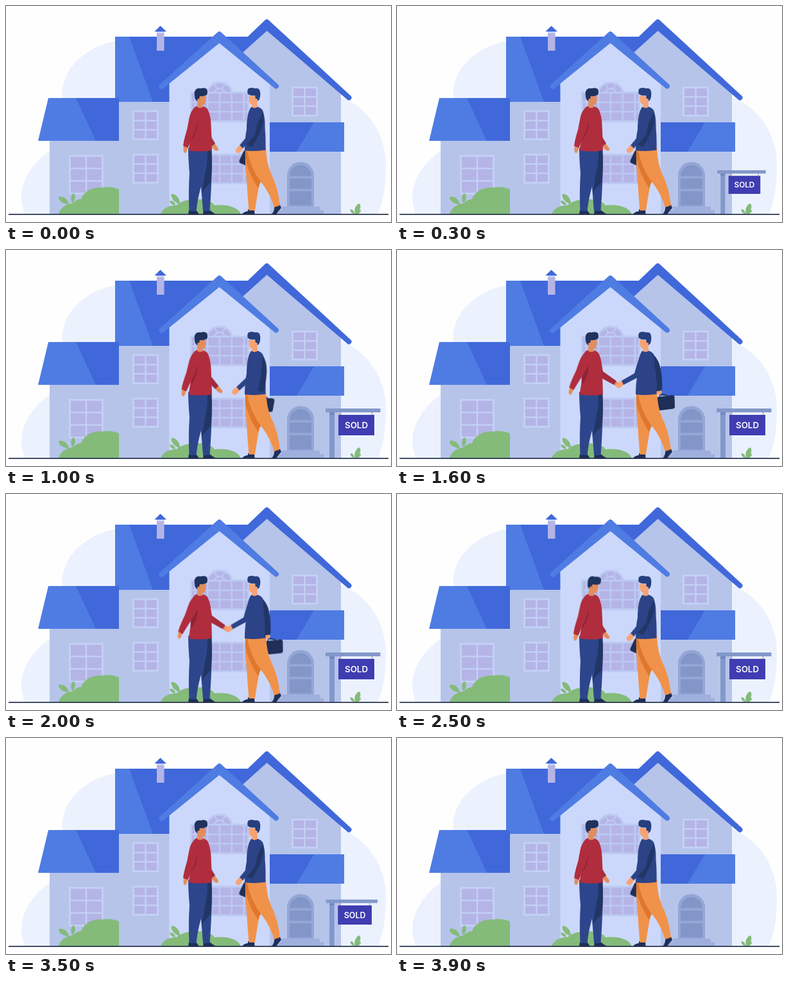
These frames come from a looping animation (600x338 px, 4 s). An HTML page:

```html
<!DOCTYPE html>
<html lang="en">
<head>
<meta charset="utf-8">
<title>House sold</title>
<style>
  html, body { margin: 0; width: 100%; height: 100%; overflow: hidden; background: #fefefe; }
  svg { display: block; width: 600px; height: 338px; }

  .sign, .head, .arm { animation: 4s cubic-bezier(.65, 0, .35, 1) infinite; }

  .sign { transform-origin: 506px 326px; animation-name: sign; }
  @keyframes sign {
    0%, 2.5% { transform: scale(0); animation-timing-function: cubic-bezier(.2, .7, .3, 1); }
    13.5%, 83.5% { transform: scale(1); animation-timing-function: cubic-bezier(.6, 0, .8, .4); }
    95%, 100% { transform: scale(0); }
  }

  .buyer .head { transform-origin: 303px 158px; animation-name: buyer-nod; }
  @keyframes buyer-nod {
    0%, 55% { transform: none; }
    62.5% { transform: rotate(10deg); }
    70%, 100% { transform: none; }
  }
  .agent .head { transform-origin: 388px 158px; animation-name: agent-nod; }
  @keyframes agent-nod {
    0%, 7.5% { transform: none; }
    15% { transform: rotate(-9deg); }
    22.5%, 100% { transform: none; }
  }

  .buyer .shake { transform-origin: 312px 168px; animation-name: buyer-shake; }
  @keyframes buyer-shake {
    0%, 17.5%, 63.75%, 100% { transform: translate(1px, 1.5px) rotate(23deg); }
    35%, 47.5% { transform: translate(0, 0) rotate(0deg); }
  }
  .agent .shake { transform-origin: 384px 165px; animation-name: agent-shake; }
  @keyframes agent-shake {
    0%, 17.5%, 62.5%, 100% { transform: translate(-1.5px, 4px) rotate(-20deg); }
    35%, 47.5% { transform: translate(0, 0) rotate(0deg); }
  }
  .buyer .swing { transform-origin: 297px 168px; animation-name: buyer-swing; }
  @keyframes buyer-swing {
    0%, 17.5%, 68%, 100% { transform: none; }
    35%, 51% { transform: rotate(9deg); }
  }
  .agent .swing { transform-origin: 397px 165px; animation-name: agent-swing; }
  @keyframes agent-swing {
    0%, 17.5%, 61.5%, 100% { transform: rotate(30deg); }
    31.5%, 47.5% { transform: none; }
  }
</style>
</head>
<body>
<svg viewBox="0 0 600 338" xmlns="http://www.w3.org/2000/svg">
  <path fill="#ebf2fe" d="M30 326C15 295 28 256 68 226C96 205 98 180 90 158C82 126 94 96 122 76C138 64 154 58 172 55L400 60L522 142C566 160 592 202 592 248C592 282 588 308 579 326Z"/>

  <!-- right wing -->
  <path fill="#b6c4ea" d="M406 34L522 136V326H400V122L366 72Z"/>

  <!-- main roof and left wing -->
  <path fill="#b6c4ea" d="M68 211H176V150H256V326H68Z"/>
  <path fill="#4068da" d="M170 48H385L360 80L254 150H170Z"/>
  <path fill="#4f7ce3" d="M170 48H192L229 150H170Z"/>
  <path fill="#4068da" stroke="#4068da" stroke-width="8" stroke-linejoin="round" d="M534.500 143.500L406.500 25L366 64V70L406.500 33.500Z"/>
  <path fill="#4f7ce3" d="M66 144H176V211H50Z"/>
  <path fill="#4068da" d="M109 144H176V211H140Z"/>
  <path fill="#b5b4e6" d="M235 40H246.500V70H235Z"/>
  <path fill="#cbd6f8" d="M235 40H246.500V42.500H235Z"/>
  <path fill="#4068da" d="M231.500 40L240.500 31L250 40Z"/>

  <!-- middle gable -->
  <path fill="#ccd8fb" d="M254.500 118L332.500 50L411 118V326H254.500Z"/>
  <path fill="#4f7ce3" stroke="#4f7ce3" stroke-width="8" stroke-linejoin="round" d="M242.500 126L332.500 44L421 125.500L332.500 53Z"/>

  <!-- porch -->
  <path fill="#4068da" d="M411 182H527V228H411Z"/>
  <path fill="#4f7ce3" d="M480 182H527V228H453Z"/>
  <path fill="#9fb0de" d="M430 314H489V319.500H495V326H420V319.500H430Z"/>
  <path fill="#93a6d6" d="M438 314V265A21 21 0 0 1 480 265V314Z"/>
  <path fill="#8396c8" d="M442 266A17 17 0 0 1 476 266ZM442 270H476V286H442ZM442 290H476V312H442Z"/>

  <g id="windows">
    <path fill="#bccaf2" d="M312.500 137A20 18 0 0 1 353.500 137Z"/>
    <path fill="#b5b4e6" d="M316 135A17 13.500 0 0 1 350 135Z"/>
    <path fill="none" stroke="#bccaf2" stroke-width="2.400" d="M325 136A8 7 0 0 1 341 136M329 129L323 119M337 129L343 119"/>
  </g>

  <!-- plants -->
  <g fill="#84bb79">
    <path d="M82 326C84 317 92 310 103 309C109 304 112 303 117 302C121 290 135 283 149 284C160 282 170 284 176 287V326Z"/>
    <path d="M241 326C244 317 255 311 265 312C274 305 283 302 292 304C304 300 320 304 325 312C343 310 362 314 366 326Z"/>
    <path d="M98 311C88 309 81 304 82 299C88 296 97 302 98 311ZM103 308C100 302 101 294 106 293C109 297 108 305 103 308Z"/>
    <path d="M271 310C262 308 256 299 258 294C265 293 272 303 271 310ZM264 312C259 311 255 308 255 305C260 304 264 308 264 312Z"/>
    <path d="M544 326C542 318 545 310 551 309C555 315 550 323 544 326ZM543 326C538 324 536 321 537 318C541 318 543 322 543 326ZM546 326C547 321 550 319 553 319C553 323 550 325 546 326Z"/>
  </g>

  <g class="sign">
    <path fill="#8398ca" d="M504 251H512V326H504Z"/>
    <path fill="#7388bd" d="M504 254H512V258H504Z"/>
    <path fill="#8398ca" d="M498 248H583.500V254H498Z"/>
    <path stroke="#b9a39d" stroke-width="1.500" d="M521.500 254V259M570.500 254V259"/>
    <path fill="#3f3db1" d="M518 258H574V290H518Z"/>
    <text x="546" y="278.800" text-anchor="middle" fill="#fff" font-family="Inter, Roboto, sans-serif" font-size="13.300" font-weight="600">SOLD</text>
  </g>

  <path stroke="#29344f" stroke-width="1.800" d="M4 326.100H596"/>

  <g class="buyer">
    <g class="arm shake">
      <path fill="#e38c5c" d="M339 205Q346 207 350 211Q351 215 346 215Q340 213 337 210Z"/>
      <path fill="#a32a3b" d="M308 166Q314 162 317 170L321 190L342 205L338 211L316 199Q310 190 308 166Z"/>
    </g>
    <path fill="#1f2f57" d="M308 319H317Q322 323 327 326H307ZM285 319H296Q299 323 301 326H284Z"/>
    <path fill="#2d468b" d="M298 222L320 224Q322 262 317.500 321H307Q304 280 298 222Z"/>
    <path fill="#223665" d="M309 226H320.500Q322 255 319 276Q310 284 305 293Q312 262 309 226Z"/>
    <path fill="#2d468b" d="M284 222L314 224Q315 252 306 276Q299 297 296.500 321H285.500Q284 290 286 262Q284 240 284 222Z"/>
    <path fill="#b02d3d" d="M296 157Q308 155 314 161Q319 171 319.500 185Q320.500 205 321 226Q304 229 284.500 226Q289 205 288 184Q288 162 296 157Z"/>
    <path fill="#8b2435" d="M299 180Q298 198 289 210L288 198Z"/>
    <g class="arm swing">
      <path fill="#e38c5c" d="M277 218L283 220Q283 226 280 230Q276 230 276.500 224Z"/>
      <path fill="#b02d3d" d="M297 157Q287 163 285 178Q283 192 279 204Q277 211 276 219L283.500 222Q289 208 294 197Q299 184 300 172Z"/>
    </g>
    <g class="head">
      <path fill="#e38c5c" d="M299 142L311 140Q312 148 310 153Q308 155 306 154L307 158Q302 161 298 158Z"/>
      <path fill="#20335f" d="M295 146Q293 139 294 134Q296 128 303 129Q310 127 313 130Q315 135 313 139Q307 142 302 141L301 146L298 149Z"/>
      <circle cx="300" cy="147" r="2" fill="#e38c5c"/>
    </g>
  </g>

  <g class="agent">
    <g class="arm swing">
      <path fill="#f8a272" d="M405 218L412 217Q414 223 411 227Q406 228 405 223Z"/>
      <path fill="none" stroke="#1f2f57" stroke-width="1.500" d="M409 231Q409 225 415 226L421 228"/>
      <path fill="#1f2f57" d="M407 230L429 227Q432 227 432.500 230L433 245Q433 248 430 248.500L410 251Q407 251 406.500 248L405 233Q405 230 407 230Z"/>
    </g>
    <path fill="#1f2f57" d="M377 318H387L387.500 326H368Q370 322 377 321ZM418 314L427 311L429 316Q424 321 421 326H414Q419 320 418 314Z"/>
    <path fill="#f0924a" d="M373 222H394L397 268Q391 298 388 320H378.500Q376 292 375 270Q372 248 373 222Z"/>
    <path fill="#df782e" d="M373 225L390 224L399 272Q395 278 393 285Q378 262 373 240Z"/>
    <path fill="#f0924a" d="M375 223L405 221Q406 246 413 262Q424 284 427 312L418 315Q411 292 397 275Q381 254 375 223Z"/>
    <path fill="#2c4487" d="M382 158Q394 155 400 163Q404 174 403.500 190Q405 205 404.500 225.500Q388 228 372 226Q372 208 375 193Q375 168 382 158Z"/>
    <g class="arm swing">
      <path fill="#223665" d="M400 164Q408 172 411 186Q414 203 413 220L404 221Q405 202 402 185Z"/>
    </g>
    <g class="arm shake">
      <path fill="#f8a272" d="M352 204Q345 206 341 210Q340 214 345 216Q351 214 354 210Z"/>
      <path fill="#2c4487" d="M378 168Q384 160 388 172Q386 190 376 199L353 211L350 204.500L370 193Q374 178 378 168Z"/>
    </g>
    <g class="head">
      <path fill="#f8a272" d="M379 140L391 142L392 158Q387 161 383 158L384 154Q381 155 380 152Q378 147 379 140Z"/>
      <path fill="#263f7e" d="M377 138Q375 132 378 129Q383 127 388 129Q395 128 396 134Q397 140 395 146L392 149L389 145L388 140Q382 141 377 138Z"/>
      <circle cx="390" cy="147" r="2" fill="#f8a272"/>
    </g>
  </g>
</svg>
<script>
  const windows = document.getElementById("windows");

  function rect(x, y, width, height, fill) {
    const node = document.createElementNS("http://www.w3.org/2000/svg", "rect");
    const attrs = { x, y, width, height, fill };
    for (const key in attrs) node.setAttribute(key, attrs[key]);
    windows.append(node);
  }

  function addWindow(x, y, w, h, cols, frame) {
    const rows = 3, edge = 3, gap = 2.4;
    const pw = (w - 2 * edge - gap * (cols - 1)) / cols;
    const ph = (h - 2 * edge - gap * (rows - 1)) / rows;
    rect(x, y, w, h, frame);
    for (let c = 0; c < cols; c++)
      for (let r = 0; r < rows; r++)
        rect(x + edge + c * (pw + gap), y + edge + r * (ph + gap), pw, ph, "#b5b4e6");
  }

  const pale = "#c3d0f5", mid = "#bccaf2";
  addWindow(98, 233, 54, 62, 2, pale);
  addWindow(197, 163, 41, 47, 2, pale);
  addWindow(197, 231, 41, 47, 2, pale);
  addWindow(445, 126, 41, 47, 2, pale);
  // Middle windows: four wide panes over narrow side lights
  for (const y of [134, 231]) {
    addWindow(287, y, 92, 48, 1, mid);
    addWindow(293.500, y, 79, 48, 4, mid);
  }
</script>
</body>
</html>
```
